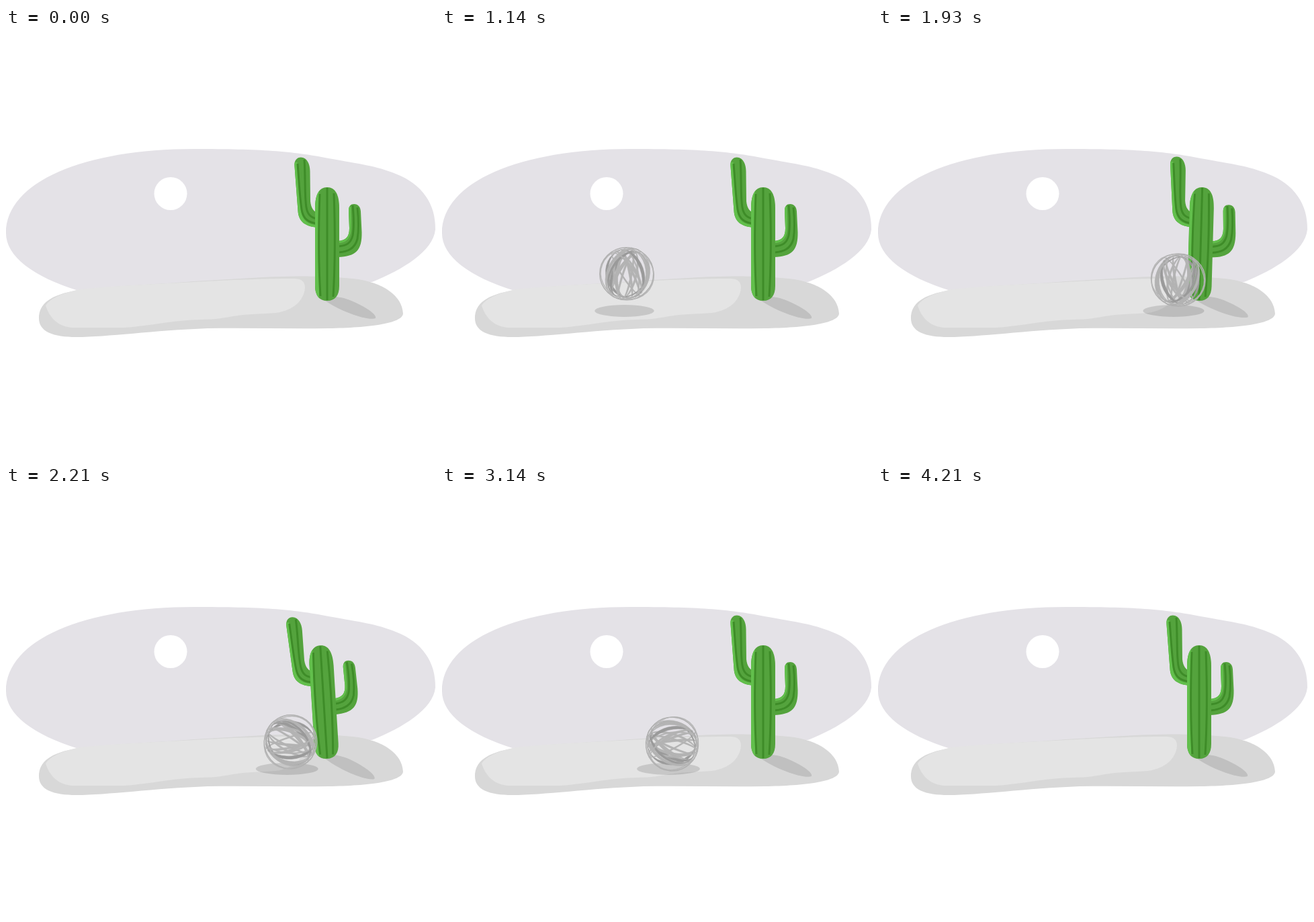
Recreate the animation shown at these times as an HTML page with a canvas. Size 640x640 px, loop 5.5 s.

```html
<!DOCTYPE html>
<html lang="en">
<head>
<meta charset="utf-8">
<title>Tumbleweed</title>
<style>
  html, body { margin: 0; width: 100%; height: 100%; overflow: hidden; background: #fff; }
  canvas { display: block; width: 100%; height: 100%; }
</style>
</head>
<body>
<canvas id="stage" width="640" height="640"></canvas>
<script>
const ctx = document.getElementById('stage').getContext('2d');
const LOOP = 5500, FPS = 14, FIRST = 5, LAST = 58, GROUND = 384;
const BASE = [478, 405];

const shapes = {
  sky: 'M108 391C40 370 0 340 0 305C0 229 116 180 280 180C380 180 425 183 480 194C530 203 550 205 580 217C619 232 640 262 639 300C636 332 590 360 545 378Z',
  dune: 'M49 432C49 410 66 397 108 390C160 384 230 381 280 377L365 372C410 369 470 368 516 373C562 378 590 399 591 425C590 440 540 446 480 447C420 448 360 446 300 447C220 450 150 460 105 460C70 460 49 452 49 432Z',
  lit: 'M59 413C66 402 85 394 110 389C160 384 220 381 280 378C330 375 385 373 430 373C440 373 445 378 445 387C443 406 428 420 402 424C380 426 365 425 345 428C325 431 312 434 290 434C245 435 220 443 175 446L100 446C78 445 65 432 59 413Z',
  shade: 'M469 402C485 397 505 400 525 411C543 420 552 428 550 432C540 436 500 424 469 402Z',
  stem: 'M460 268C460 248 466 237 478 237C490 237 496 248 496 268L496 384C496 398 490 406 478 406C466 406 460 398 460 384Z',
  left: 'M429.5 206C428.5 197 433 192.5 439 192.5C448 192.5 452.5 203 452.5 213L453 258C454 268 458 274 466 276L466 297C445 296 435.5 288 434.5 272Z',
  right: 'M510 272C510 265 513 262 518 262C524 262 527.5 266 528 273L529.5 304C530 331 521 340 494 341L494 317C506 316 511 311 511 298Z'
};
for (const key in shapes) shapes[key] = new Path2D(shapes[key]);

const ribs = new Path2D('M467 247C465 300 465 350 468 399M478 238V405M488 246C490 300 490 350 487 400');
const leftRibs = new Path2D('M434 202C436 225 437 250 440 270C442 284 450 290 464 291M444 196C446 225 444 248 447 267C449 279 455 283 465 284');
const rightRibs = new Path2D('M516 264C518 285 518 298 516 309C513 321 506 324 495 325M523 267C525 285 525 302 523 314C519 329 508 333 495 334');
const leftGlow = new Path2D('M430 200C431 225 433 250 436 273C437 286 446 296 465 297');
const rightGlow = new Path2D('M511 266C511 278 512 290 511 302C509 314 504 317 494 318');

// Knots are [step, value]; slopes stay flat at turning points.
function track(knots) {
  const slope = i => (knots[i + 1][1] - knots[i][1]) / (knots[i + 1][0] - knots[i][0]);
  const tangent = i => {
    if (i === 0) return slope(0);
    if (i === knots.length - 1) return slope(i - 1);
    const a = slope(i - 1), b = slope(i);
    return a * b > 0 ? 2 * a * b / (a + b) : 0;
  };
  return n => {
    if (n <= knots[0][0]) return knots[0][1];
    if (n >= knots[knots.length - 1][0]) return knots[knots.length - 1][1];
    let i = 0;
    while (n > knots[i + 1][0]) i++;
    const [n0, v0] = knots[i], [n1, v1] = knots[i + 1];
    const d = n1 - n0, u = (n - n0) / d, w = 1 - u;
    return w * w * (1 + 2 * u) * v0 + u * u * (3 - 2 * u) * v1
      + d * u * w * (w * tangent(i) - u * tangent(i + 1));
  };
}

const ballX = track([[5, 81], [11, 177], [12, 198], [20, 347.5], [24, 415], [27, 447], [28, 449], [36, 349], [40, 322], [44, 342.5], [52, 458], [58, 567]]);
const shadowX = track([[5, 76], [11, 170.5], [12, 192], [20, 345], [24, 408], [27, 440], [28, 442], [36, 347], [40, 318], [44, 337], [52, 453], [58, 562]]);
const spin = track([[5, -140], [11, 0], [20, 155], [27, 270], [36, 45], [40, -15], [44, 4], [52, 175], [58, 320]]);
const tilt = track([[26, 0], [27, 1.6], [28, 3.5], [29, 1.5], [31, -3.5], [33, 1], [35, -0.2], [36, 0]]);

// Each hop: first step, last step, height.
const hops = [[-1, 11, 30], [12, 22, 19], [22, 32, 9], [44, 52, 11], [52, 60, 14]];
function lift(n) {
  const hop = hops.find(([a, b]) => n >= a && n < b);
  if (!hop) return 0;
  const u = (n - hop[0]) / (hop[1] - hop[0]);
  return 4 * hop[2] * u * (1 - u);
}

let seed = 29;
function rand(lo, hi) {
  seed = (seed * 16807) % 2147483647;
  return lo + (hi - lo) * seed / 2147483647;
}

// Twigs are crescents bowed across the ball, thin at both ends.
const twigs = Array.from({ length: 24 }, (_, i) => {
  const rx = rand(36, 40), ry = rand(3, 32), w = rand(1.5, 4.5);
  const turn = rand(-0.65, 0.65) + (i % 2) * Math.PI;
  const path = new Path2D();
  path.ellipse(0, 0, rx, ry + w, turn, 0, Math.PI);
  path.ellipse(0, 0, rx, ry, turn, Math.PI, 0, true);
  return { path, color: i % 5 === 0 ? '#9a9a9a' : '#b3b3b3' };
});

function fill(path, color) {
  ctx.fillStyle = color;
  ctx.fill(path);
}

function line(path, color, width) {
  ctx.strokeStyle = color;
  ctx.lineWidth = width;
  ctx.stroke(path);
}

function oval(x, y, rx, ry, turn = 0) {
  const path = new Path2D();
  path.ellipse(x, y, rx, ry, turn, 0, Math.PI * 2);
  return path;
}

function pivot(deg, draw) {
  ctx.save();
  ctx.translate(...BASE);
  ctx.rotate(deg * Math.PI / 180);
  ctx.translate(-BASE[0], -BASE[1]);
  draw();
  ctx.restore();
}

function limb(shape, lines, drawGlow) {
  fill(shape, '#54a33d');
  ctx.save();
  ctx.clip(shape);
  drawGlow();
  line(lines, '#3e8c28', 3);
  ctx.restore();
}

function drawCactus() {
  limb(shapes.left, leftRibs, () => line(leftGlow, '#62bf4c', 7));
  limb(shapes.right, rightRibs, () => line(rightGlow, '#62bf4c', 5));
  limb(shapes.stem, ribs, () => {
    ctx.fillStyle = '#62bf4c';
    ctx.fillRect(460, 237, 6, 170);
  });
}

function drawBall(n) {
  ctx.save();
  ctx.translate(ballX(n), GROUND - lift(n));
  ctx.rotate(spin(n) * Math.PI / 180);
  for (const { path, color } of twigs) {
    fill(path, color);
    line(path, color, 0.6);
  }
  line(oval(0, 0, 39, 40), '#b0b0b0', 1.6);
  line(oval(1, -1, 37, 40, 0.4), '#b5b5b5', 1.3);
  ctx.restore();
}

function render(ms) {
  const n = Math.floor((ms + 5) * FPS / 1000);
  const shown = n >= FIRST && n <= LAST;
  const alpha = Math.min(1, (n - FIRST + 1) / 3, (LAST + 1 - n) / 3);
  ctx.fillStyle = '#fff';
  ctx.fillRect(0, 0, 640, 640);
  fill(shapes.sky, '#e4e2e7');
  fill(oval(245, 246.5, 24.5, 24.5), '#fff');
  fill(shapes.dune, '#d8d8d8');
  fill(shapes.lit, '#e4e4e4');
  pivot(-0.9 * tilt(n), () => fill(shapes.shade, '#c0c0c0'));
  if (shown) {
    ctx.globalAlpha = alpha;
    fill(oval(shadowX(n), 421, 47 - lift(n) * 0.15, 9), 'rgba(0,0,0,.13)');
    ctx.globalAlpha = 1;
  }
  pivot(tilt(n), drawCactus);
  if (shown) {
    ctx.globalAlpha = alpha;
    drawBall(n);
    ctx.globalAlpha = 1;
  }
}

const start = performance.now();
function tick() {
  render((performance.now() - start) % LOOP);
  requestAnimationFrame(tick);
}
tick();
</script>
</body>
</html>
```
